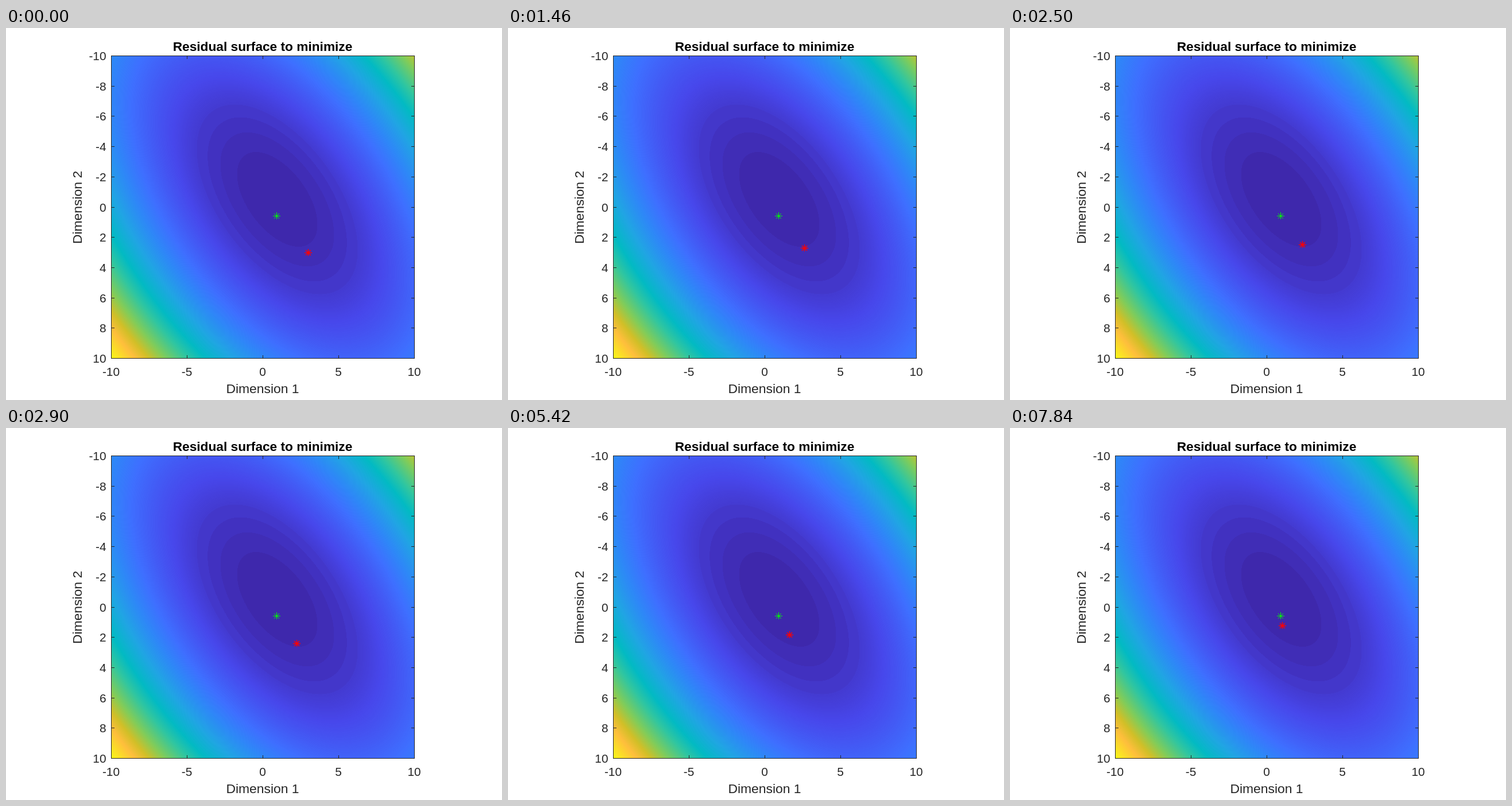
These frames come from a looping animation (864 px wide and 648 px high, 8000 ms). An HTML page with a canvas:

```html
<!DOCTYPE html>
<html lang="en">
<head>
<meta charset="utf-8">
<title>Residual surface</title>
<style>
  html, body { margin: 0; width: 100%; height: 100%; overflow: hidden; background: #fff; }
  canvas, svg { position: absolute; left: 0; top: 0; display: block; }
  text { font-family: "Liberation Sans", Arial, sans-serif; fill: #262626; text-anchor: middle; }
  .tick { font-size: 20.83px; }
  .side { text-anchor: end; }
  .label { font-size: 22.9px; }
  .title { font-size: 22.7px; font-weight: bold; fill: #000; }
</style>
</head>
<body>
<canvas id="surface" width="864" height="648"></canvas>
<svg id="chart" width="864" height="648" viewBox="0 0 864 648">
  <text class="title" x="447" y="40">Residual surface to minimize</text>
  <text class="label" x="447" y="636">Dimension 1</text>
  <text class="label" transform="translate(132 312.5) rotate(-90)">Dimension 2</text>
</svg>
<script>
const LEFT = 183, TOP = 48, WIDTH = 528, HEIGHT = 527;
const LOOP = 8000, PEAK = 43.3;
const chart = document.getElementById('chart');

// Colour scale from the floor of the bowl to its highest corner.
const SCALE = {
  0: '#3e26a8', 0.11: '#4747eb', 0.22: '#3e6fff', 0.29: '#2e87f7',
  0.38: '#20a5e3', 0.48: '#02bac3', 0.56: '#31c69f', 0.67: '#81cc59',
  0.76: '#d1bf27', 0.84: '#febe3c', 1: '#f9fb15'
};

function makeRamp(size) {
  const canvas = document.createElement('canvas');
  canvas.width = size;
  canvas.height = 1;
  const ctx = canvas.getContext('2d');
  const gradient = ctx.createLinearGradient(0, 0, size, 0);
  for (const stop in SCALE) gradient.addColorStop(+stop, SCALE[stop]);
  ctx.fillStyle = gradient;
  ctx.fillRect(0, 0, size, 1);
  return ctx.getImageData(0, 0, size, 1).data;
}

// Tilted quadratic bowl, 1 on the rim of its flat floor.
function residual(x, y) {
  const u = (x - 472.5) / 70, v = (y - 298.5) / 82.5, tilt = 0.53;
  return (u * u - 2 * tilt * u * v + v * v) / (1 - tilt * tilt) * 0.72;
}

function drawSurface() {
  const ctx = document.getElementById('surface').getContext('2d');
  const image = ctx.createImageData(WIDTH, HEIGHT);
  const size = 1024, ramp = makeRamp(size);
  for (let y = 0, p = 0; y < HEIGHT; y++) {
    for (let x = 0; x < WIDTH; x++, p += 4) {
      const q = residual(LEFT + x + 0.5, TOP + y + 0.5);
      const ring = q / 0.72;
      const height = ring < 4 ? (Math.floor(ring) + 0.4) * 0.72 : q;
      const i = Math.min(size - 1, Math.floor(height / PEAK * size)) * 4;
      image.data.set(ramp.subarray(i, i + 4), p);
    }
  }
  ctx.putImageData(image, LEFT, TOP);
}

function add(tag, attrs, content = '') {
  const node = document.createElementNS(chart.namespaceURI, tag);
  for (const name in attrs) node.setAttribute(name, attrs[name]);
  node.textContent = content;
  chart.append(node);
  return node;
}

function drawAxes() {
  const right = LEFT + WIDTH, bottom = TOP + HEIGHT;
  let path = `M${LEFT + .5} ${TOP + .5}h${WIDTH}v${HEIGHT}h${-WIDTH}z`;
  for (let n = -10; n <= 10; n += 5) {
    const x = LEFT + (n + 10) / 20 * WIDTH;
    path += `M${x + .5} ${TOP}v6M${x + .5} ${bottom + 1}v-6`;
    add('text', { class: 'tick', x, y: 605.5 }, n);
  }
  for (let n = -10; n <= 10; n += 2) {
    const y = TOP + Math.round((n + 10) / 20 * HEIGHT);
    path += `M${LEFT} ${y + .5}h6M${right + 1} ${y + .5}h-6`;
    add('text', { class: 'tick side', x: 174.5, y: y + 8 }, n);
  }
  add('path', { d: path, fill: 'none', stroke: '#262626' });
}

const addStar = (stroke, width) => add('path', {
  d: 'M-6 .5H7M.5 -6V6M-4 -4L5 5M5 -4L-4 5', stroke, 'stroke-width': width
});
const place = (star, x, y) => star.setAttribute('transform', `translate(${x} ${y})`);

// Descent in whole pixels: x slows down slightly while y speeds up.
const descend = (from, speed, gain, s) => Math.round(from - speed * s - gain * s * s);

drawSurface();
drawAxes();
place(addStar('#0f0', 1), 471, 327);
const walker = addStar('#f00', 1.4);
const start = performance.now();

function render() {
  const s = Math.max(0, performance.now() - start) % LOOP / 1000;
  place(walker, descend(526, 7.08, -0.065, s), descend(391, 5.29, 0.082, s));
  requestAnimationFrame(render);
}
render();
</script>
</body>
</html>
```
